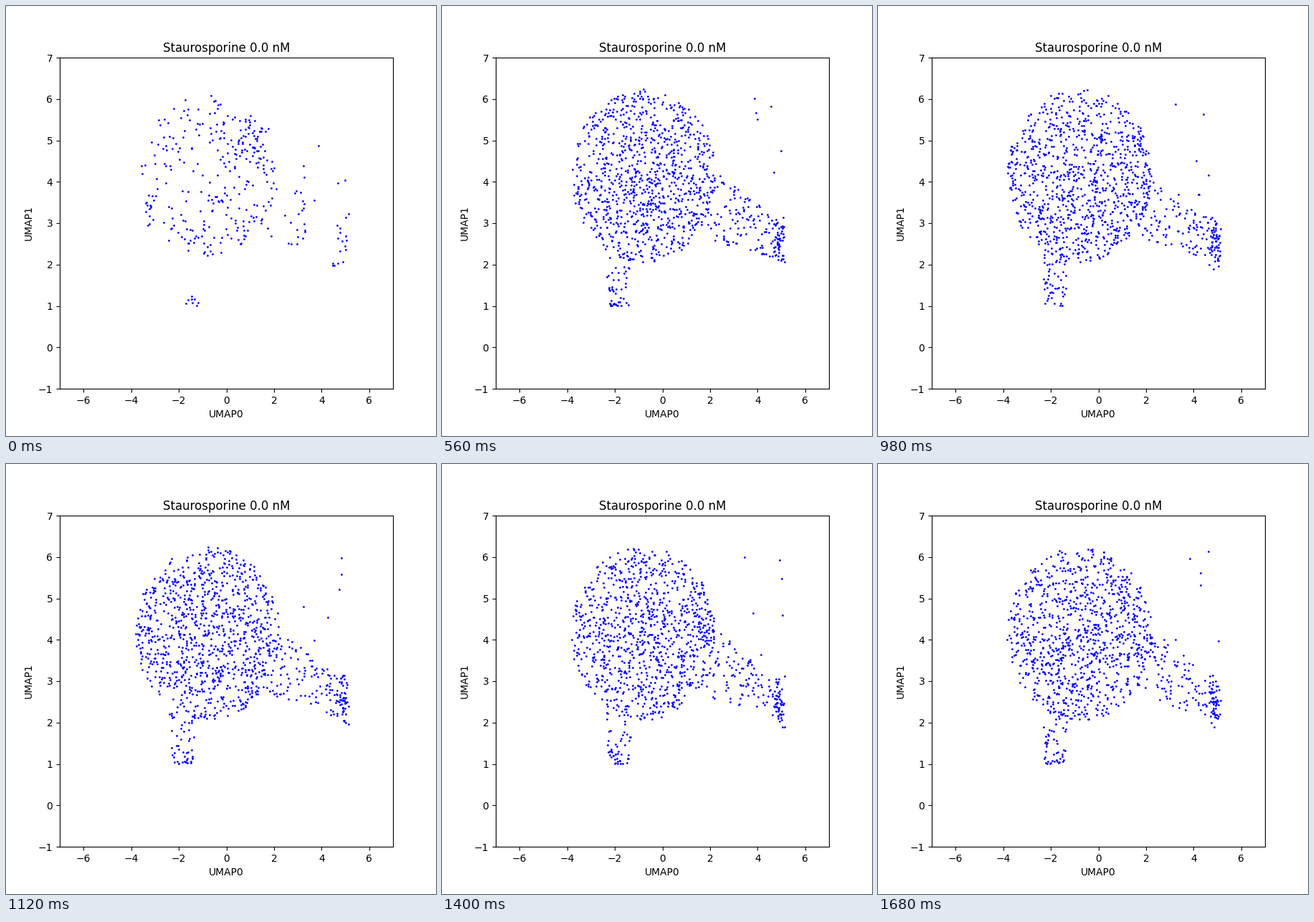
Write a matplotlib script that moves like this. It is 600x600 px and loops after 1820 ms.

```python
import numpy as np
import matplotlib.pyplot as plt
from matplotlib.animation import FuncAnimation

FRAMES, INTERVAL = 13, 140


def body(rng, n, power=0.53, scale=1.0):
    """Main cloud: a filled ellipse; power < 0.5 favours the rim."""
    r = scale * rng.random(n) ** power
    a = rng.uniform(0, 2 * np.pi, n)
    return np.column_stack([-0.8 + 3.05 * r * np.cos(a),
                            4.15 + 2.1 * r * np.sin(a)])


def arm(rng, n, end=5.1):
    """Band that narrows and sinks to the right."""
    x = rng.uniform(1.6, end, n)
    half = 0.9 - 0.13 * (x - 1.8)
    return np.column_stack([x, 3.55 - 0.32 * (x - 1.8)
                            + half * rng.uniform(-1, 1, n)])


def foot(rng, n):
    """Small lobe below the cloud, densest at its base."""
    t = rng.random(n) ** 1.6
    x = -1.85 + (0.42 + 0.15 * t) * rng.uniform(-1, 1, n)
    return np.column_stack([x, 1.0 + 1.3 * t])


def clump(rng, center, spread, n):
    offset = np.clip(rng.normal(0, 1, (n, 2)), -1.9, 1.9)
    return np.array(center) + offset * spread


def strays(rng, n, top):
    return rng.uniform((3.2, 3.5), (5.1, top), (n, 2))


def sparse_cells(rng):
    cloud = body(rng, 300, 0.45, 0.93)
    x, y = cloud.T
    thin = (x < -0.8) & (y > 2.9) & (rng.random(len(x)) > 0.5)
    return [cloud[~thin],
            arm(rng, 28, 3.4),
            strays(rng, 6, 5.0),
            clump(rng, (1.1, 4.9), (0.35, 0.22), 32),
            clump(rng, (-3.27, 3.3), (0.1, 0.2), 12),
            clump(rng, (4.85, 2.6), (0.2, 0.33), 17),
            clump(rng, (-1.5, 1.15), (0.2, 0.08), 8)]


def full_cells(rng):
    return [body(rng, 970),
            arm(rng, 125),
            foot(rng, 50),
            strays(rng, 6, 6.25),
            clump(rng, (4.88, 2.52), (0.14, 0.33), 42)]


def cells(i):
    rng = np.random.default_rng(40 + i)
    return np.vstack(full_cells(rng) if i else sparse_cells(rng))


fig, ax = plt.subplots(figsize=(6, 6), dpi=100)
dots, = ax.plot([], [], "b.", ms=2)
ax.set(xlim=(-7, 7), ylim=(-1, 7), xlabel="UMAP0", ylabel="UMAP1",
       title="Staurosporine 0.0 nM")


def update(i):
    dots.set_data(*cells(i).T)
    return dots,


anim = FuncAnimation(fig, update, frames=FRAMES, interval=INTERVAL,
                     repeat=True, repeat_delay=0)
plt.show()
```
